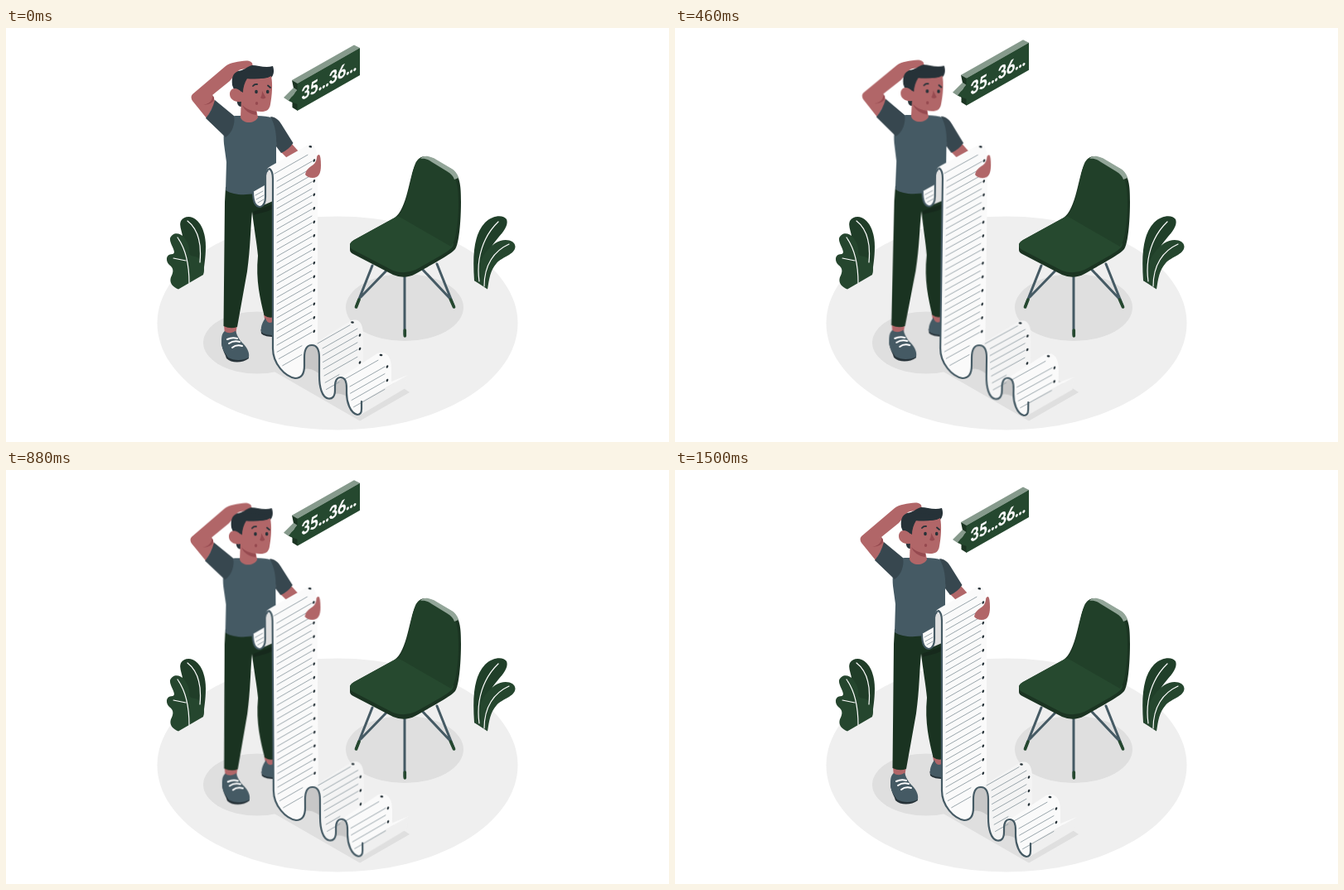
Animation of 800 by 500 pixels, one loop 1.54 s. Source, as an HTML page:

```html
<!DOCTYPE html>
<html lang="en">
<head>
<meta charset="utf-8">
<title>Counting the list</title>
<style>
html, body { margin: 0; width: 100%; height: 100%; overflow: hidden; background: #fff; }
svg { display: block; width: 800px; height: 500px; }
#man { transform-origin: 352px 253px; }
.line { fill: none; stroke-linecap: round; stroke-linejoin: round; }
.vein { stroke: #fff; stroke-width: 1.2; }
.leg { stroke: #455a64; stroke-width: 3; }
.tip { stroke: #25482f; stroke-width: 3.6; }
.edge { stroke: #455a64; stroke-width: 2.2; }
.rule { stroke: #8f9ca3; stroke-width: .9; }
.lace { stroke: #fff; stroke-width: 2; }
.skin { fill: #b16668; }
.shade { fill: #964a50; }
.hair { fill: #263238; }
.shirt { fill: #455a64; }
.sleeve { fill: #37474f; }
.pants { fill: #1a3321; }
text { font: 700 20.5px Lato, "Open Sans", sans-serif; fill: #fff; stroke: #fff; stroke-width: .5; }
</style>
</head>
<body>
<svg viewBox="0 0 800 500">
  <ellipse cx="400" cy="356.5" rx="217.5" ry="129" fill="#efefef"/>
  <g fill="#dfdfdf">
    <ellipse cx="481" cy="337.5" rx="71" ry="40.5"/>
    <ellipse cx="303" cy="380" rx="65" ry="37.5"/>
    <path d="M322 414L427 474.500L487 440L481 436L410 395Z"/>
  </g>

  <!-- plants -->
  <path fill="#203d28" d="M213 256C214 247 208 240 211 233C215 227 224 226 231 233C238 240 241 252 241 264C241 277 239 288 238 297L224 302Z"/>
  <path fill="#25462e" d="M208 315.500C200 312 197 307 199 301C202 295 203 290 197 286C192 281 193 273 201 273C207 271 197 261 198 254C201 246 210 247 215 253C220 260 222 265 221 272C223 278 229 273 235 280C239 286 240 292 238 298Z"/>
  <path fill="#203f29" d="M565 305C563 275 564 250 578 235C587 226 600 225 604 231C608 242 592 253 586 264L578 312Z"/>
  <path fill="#25462e" d="M581 315.500L565 305C570 284 577 269 590 260C601 253 614 256 614.500 264C614 274 599 276 592 284C584 293 583 303 581 315.500Z"/>
  <g class="line vein">
    <path d="M219 233C232 243 236 262 234 283M207 253C217 267 221 285 221 308M202 278L217 281"/>
    <path d="M594 234C576 251 567 278 571 306M607 261C589 269 577 286 577 312"/>
  </g>

  <!-- chair -->
  <path class="line leg" d="M442 287L423 335M459 293L428 325M481 299V370M520 285L540 335M503 292L536 327"/>
  <path class="line tip" d="M426 328L422.500 337M481.300 365V372M536.500 328L540.500 337"/>
  <path fill="#1b3422" d="M415 262Q415 259 420 256L469 229C484 219 487 178 494 164C498 155 505 153 514 157L537 170C548 177 549 190 549 210C549 232 547 259 542 267C538 273 506 290 494 297Q481 304 467 298L419 273Q415 271 415 268Z"/>
  <path fill="#26492f" d="M415 262Q415 259 420 256L473 227L540 260C540 266 536 269 494 292Q481 298 467 293L419 268Q415 266 415 262Z"/>
  <path fill="#214029" d="M473 227C485 216 488 178 494 164C498 155 505 154 513 159L535 172C544 178 546 192 546 213C546 233 543 258 537 264Z"/>
  <path fill="#93a699" d="M500 158C504 153 511 155 516 157L537 169.500C542 172 545 177 546 181L541 183C540 179 537 176 532 173L514 162C509 158 504 157 500 158Z"/>

  <g id="man">
    <!-- legs and shoes -->
    <path class="skin" d="M263 358H279L277 371H264ZM311 345H323V358H313Z"/>
    <path class="hair" d="M307.500 364L308 369C311 372 317 373 323 373V364ZM260 380C261 390 265 394 266 399C272 405 285 405 293 399L292 394Z"/>
    <path class="shirt" d="M308 367C307 360 310 355 313 350C315 357 319 357 323 354V371C317 371 311 370 308 367ZM260 381C260 374 260 369 264 366C267 369 273 369 277 365.500C279 372 281 376 286 381C292 387 294 393 293 398C286 402 275 402 268 398C265 393 261 390 260 381Z"/>
    <path class="line lace" d="M267 376Q273 373 279 375M269 381Q275 377 282 379M273 386Q278 382 285 384"/>
    <path class="pants" d="M265 192L264 210L262.500 360Q271 364 279 361L291 294C295 266 295 240 297 222C299 240 303 262 304 275C301 305 307 328 311.500 347Q317 351 323 349L326 196Z"/>
    <path fill="#16291c" d="M298 222L322 213V218C314 223 306 223 299 226Z"/>

    <!-- torso and arms -->
    <path class="skin" d="M331 149L345 140L353 149L340 158Z"/>
    <path class="shirt" d="M283 106C275 106 269 106 266 111C263 119 262 130 263 140L266 162L265 196C274 202 289 202 299 200L326 190V143L330 120C328 109 319 106 302 106Z"/>
    <path class="sleeve" d="M319 107C328 108 331 114 334 119L346.500 139Q341 147 332 151L326 143C327 131 325 117 319 107Z"/>
    <path class="skin" d="M297 47C299 42 295 39.500 290 39.500C281 40 270 42 265 46L225 80Q222 83 225 88L242 109L253 90L249 81L270 64L281 51C286 49 293 49 297 47Z"/>
    <path class="shade" d="M238 93C245 91 249 89 249.500 81L251 84C252 89 247 92 238 93Z"/>
    <path class="sleeve" d="M252 87L275 106C277 115 273 127 265 132L241 109Q249 99 252 87Z"/>

    <!-- head -->
    <path class="hair" d="M273 69C272 59 274 55 280 52C288 51 290 47 297 45C304 45 313 49 322 46C324 52 323 57 320 60L294 66L284 95C278 95 279 88 278 82Z"/>
    <path class="skin" d="M284 84L283 108C286 116 300 116 304 108L302 98Z"/>
    <path class="shade" d="M285 93C290 98 296 100 302 101V105C294 104 288 100 285 93Z"/>
    <path class="skin" d="M289 61C300 62 311 62 320 58C322 67 321 82 319 92C318 99 314 101 308 101C298 101 289 96 284 89C276 90 270 86 270 80C270 73 277 70 284 77Z"/>
    <path class="hair" d="M286 78C282 75 279 72 276 72L274 62L290 52L321 54Q320 60 312 60.500Q300 61 291 61Q286 69 286 78Z"/>
    <g class="hair"><ellipse cx="302" cy="77" rx="1.800" ry="2.200"/><ellipse cx="315.700" cy="77" rx="1.800" ry="2.200"/></g>
    <path class="line" stroke="#263238" stroke-width="1.800" d="M298 70Q300 67.500 303 68M316 69.500L319 72"/>
    <path class="shade" d="M309 76L313.500 84Q310 87 307 84Q309 82 309 76Z"/>
    <ellipse class="shade" cx="302.500" cy="91" rx="1.700" ry="2.100"/>

    <!-- paper -->
    <path fill="#fafafa" d="M298 198L312 190V212Q306 219 301 213Q298 208 298 198Z"/>
    <path class="line rule" d="M301 202L310 197M302 207L311 202M304 211L311 207"/>
    <path fill="#e0e0e0" d="M313 175L322 170V209L306 216Q313 213 313 204Z"/>
    <path fill="#c7c7c7" d="M360 398Q361 384 369 383L383 388V422Q370 409 360 412ZM397 440Q397 424 404 422L415 428V448Q405 440 397 442Z"/>
    <path fill="#fafafa" d="M314 172Q315 169 319 167L364 141.500Q370 139 373 145Q376 150 376 165V379L364 386Q360 390 360 398V408C360 418 356 423 349 423C337 421 322 406 322 387V182Q321 172 314 172Z"/>
    <g id="main" class="line rule"></g>
    <path fill="#f4f4f4" d="M369 383L415 354C427 349 431 358 431 372V408L397 428V437C397 445 394 448 389 447.500C381 446 378 433 378 420V398C378 388 375 383 369 383Z"/>
    <g id="fold1" class="line rule"></g>
    <path fill="#efefef" d="M429 451L484 420L482 435L428 467Z"/>
    <path fill="#fafafa" d="M404 422L448 393C460 389 465 398 465 411V427L485 419L429 451V460Q429 467 424 467C415 465 411 451 411 441V435C411 427 409 422 404 422Z"/>
    <g id="fold2" class="line rule"></g>
    <path class="line edge" d="M298 198C298 209 301 216 307 216Q313 214 313 204V178Q314 171 318 170Q322 173 322 182V387C322 406 337 421 349 423C356 423 360 418 360 408V398C360 388 363 383 369 383C375 383 378 388 378 398V420C378 433 381 446 389 447.500C394 448 397 445 397 437V433C397 426 399 422 404 422C409 422 411 427 411 435V441C411 451 415 465 424 467Q429 467 429 460V451"/>
    <g id="holes" fill="#263238"></g>
    <path class="skin" d="M361 177Q362 171 368 167Q374 164 375 157Q375 153 378 153Q380 155 380 166C380 176 377 181 370 181Q364 181 361 177Z"/>
  </g>

  <g id="bubble">
    <path fill="#1b3422" d="M345 63L352 66V100L345.500 96V90L336 84L349 82Z"/>
    <path fill="#869a8c" d="M345 63L420 20.500L427 24L351.500 67ZM335 84L347 72L351.500 75L341 88Z"/>
    <path fill="#25482f" d="M351.500 67L427 24V57L351.500 100V92L341 88L351.500 75Z"/>
    <text transform="matrix(.866 -.485 0 1 356.500 87.500)">35...36...</text>
  </g>
</svg>
<script>
const $ = id => document.getElementById(id);
const add = (parent, tag, attrs) => {
  const el = document.createElementNS('http://www.w3.org/2000/svg', tag);
  for (const k in attrs) el.setAttribute(k, attrs[k]);
  $(parent).append(el);
};

const SLOPE = 0.57, GAP = 8.25;
const rule = (id, x1, x2, y) =>
  add(id, 'path', { d: `M${x1} ${y}L${x2} ${y - (x2 - x1) * SLOPE}` });

// Ruled lines, bent to the right where the sheet curls
rule('main', 324, 364, 176);
for (let i = 0; i < 28; i++) {
  const y = 185 + i * GAP;
  const bend = Math.max(0, y - 388) ** 2 / 58;
  rule('main', 327 + bend, y > 394 ? 357 : 369, y);
}
rule('fold1', 376, 415, 381);
for (let i = 0; i < 7; i++) rule('fold1', 382 + i * i / 8, i > 4 ? 402 : 424, 387 + i * GAP);
rule('fold2', 409, 449, 424);
for (let i = 0; i < 4; i++) rule('fold2', 415 + i * i / 2, 457, 433 + i * GAP);

// Punched holes
const hole = (x, y, turn = 25) =>
  add('holes', 'ellipse', { cx: x, cy: y, rx: 1.2, ry: 1.9, transform: `rotate(${turn} ${x} ${y})` });
for (let i = 0; i < 12; i++) hole(371.8, 184.8 + i * 16.5);
hole(371.8, 160);
for (let i = 0; i < 3; i++) hole(427, 371 + i * 16.5);
for (let i = 0; i < 2; i++) hole(460, 409 + i * 16.5);
for (const [x, y] of [[367.3, 143.3], [418, 355.5], [452.5, 395]]) hole(x, y, 100);

// One 1500 ms swing followed by a short rest
const LOOP = 1540;
const loop = (id, steps) => $(id).animate(
  steps.map(([ms, transform]) => ({ offset: ms / LOOP, transform })),
  { duration: LOOP, iterations: Infinity, easing: 'linear' });

const turn = deg => `rotate(${deg}deg)`;
const lift = px => `translateY(${px}px)`;
loop('man', [[0, turn(0)], [375, turn(1)], [1125, turn(-1)], [1500, turn(0)], [LOOP, turn(0)]]);
loop('bubble', [[0, lift(0)], [750, lift(-10)], [1500, lift(0)], [LOOP, lift(0)]]);
</script>
</body>
</html>
```
